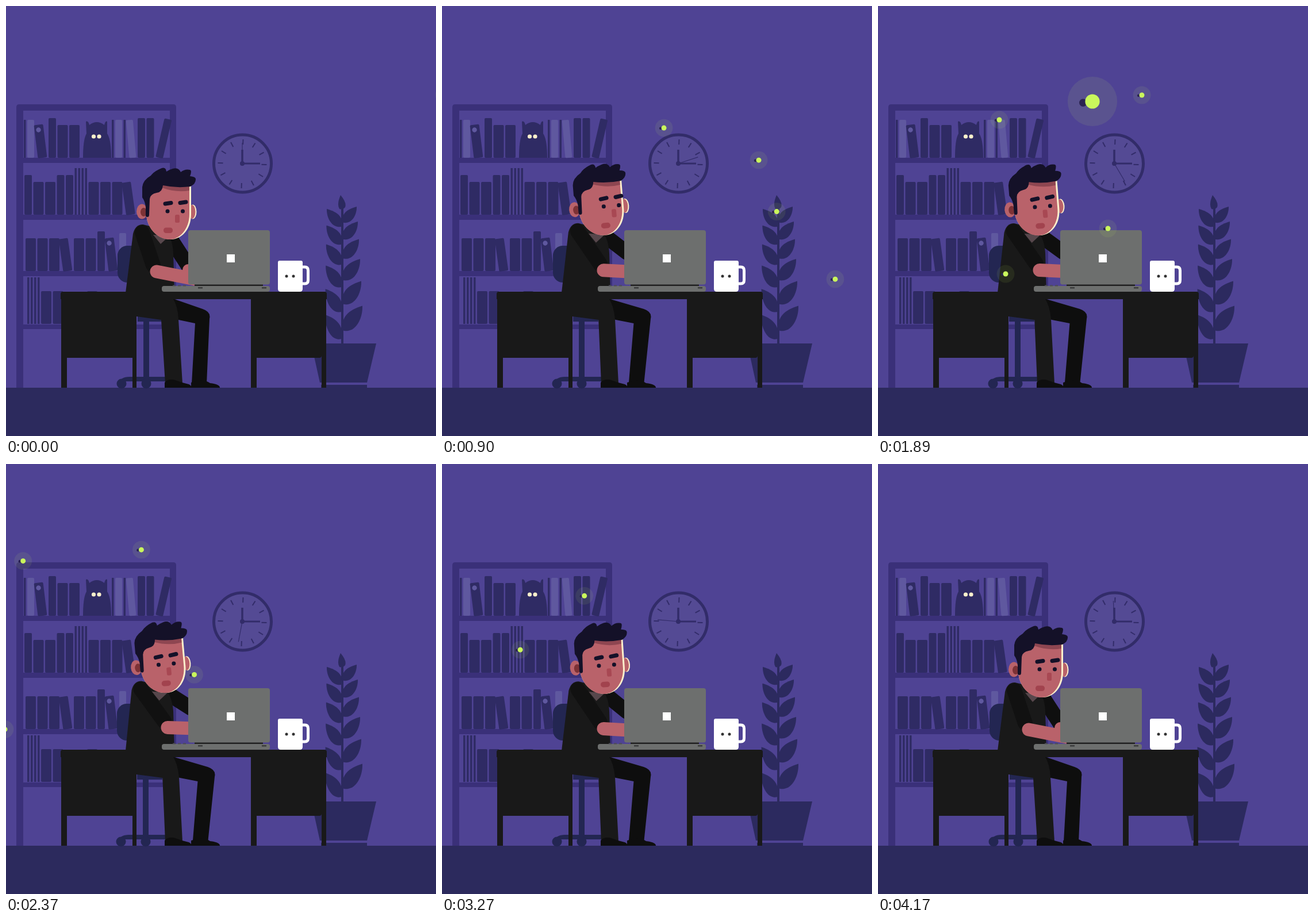
Animation of 748 by 748 pixels, one loop 4.2 s. Source, as an HTML page:

```html
<!DOCTYPE html>
<html lang="en">
<head>
<meta charset="utf-8">
<title>Night shift</title>
<style>
  html, body { margin: 0; width: 100%; height: 100%; overflow: hidden; background: #4f4394; }
  svg { display: block; width: 100vw; height: 100vh; }
  .shelf { fill: #3a3079; }
  .book { fill: #2f2b64; }
  .light { fill: #5f589f; }
  .night { fill: #2c2a5f; }
  .chair { fill: #232652; }
  .ink { fill: #141128; }
  .desk { fill: #191919; }
  .black { fill: #0e0e0e; }
  .skin { fill: #b9626a; }
  .cream { fill: #fdf0cc; }
  .grey { fill: #6d6f6e; }
  .dial { stroke: #322c69; fill: none; }
  .limb { fill: none; stroke-linecap: round; }
  .brow { stroke: #141128; stroke-width: 7; stroke-linecap: round; }
</style>
</head>
<body>
<svg viewBox="0 0 748 748">
  <rect width="748" height="748" fill="#4f4394"/>

  <g id="shelves">
    <path class="shelf" fill-rule="evenodd" d="M18 664V176Q18 171 23 171H291Q296 171 296 176V664H285V182H30V664Z"/>
    <path class="shelf" d="M30 264H285V273H30ZM30 363H285V372H30ZM30 461H285V470H30ZM30 554H285V562H30Z"/>
  </g>
  <path class="book" d="M134 264Q134 232 140 222L139 201Q143 199 145 207Q158 197 171 207Q173 199 176 201L176 222Q183 232 183 264Z"/>
  <g class="cream"><circle cx="152.500" cy="227" r="3.600"/><circle cx="162" cy="227" r="3.600"/></g>

  <g class="dial">
    <circle cx="411.500" cy="274" r="50" fill="#544a94" stroke-width="5"/>
    <g id="ticks" stroke-width="2"></g>
    <path d="M411 274V250" stroke-width="3.500"/>
    <path d="M411 274H442" stroke-width="3"/>
    <path id="second" d="M411 274V238" stroke-width="1.200"/>
    <circle cx="411" cy="274" r="4" fill="#322c69" stroke="none"/>
  </g>

  <g id="plant" class="night">
    <path d="M583 345H587V590H583ZM582 329Q593 342 590 350Q586 355 580 353Q575 345 582 329Z"/>
    <path d="M531 587H644L628 655H546ZM548 659H628V665H548Z"/>
  </g>

  <rect y="664" width="748" height="84" fill="#2c2a5d"/>

  <g id="chair" class="chair">
    <rect x="193" y="417" width="45" height="64" rx="17"/>
    <path d="M228 540H272V549H228ZM238 541H248V660H238ZM196 657Q197 645 214 645H284V653H206Z"/>
    <circle cx="200" cy="657" r="8.500"/><circle cx="243" cy="657" r="8.500"/>
  </g>

  <path id="farLeg" class="black"/>
  <path class="black" d="M322 664V655Q345 648 355 656Q372 658 372 664Z"/>
  <path id="nearLeg" class="desk"/>
  <path class="black" d="M276 664V655Q280 649 292 650Q305 655 318 658Q323 660 322 664Z"/>

  <path id="farArm" class="limb" stroke="#0f0f0f" stroke-width="26"/>
  <ellipse id="farHand" class="skin" cy="459" rx="10" ry="10"/>
  <path id="torso" class="desk"/>
  <path id="collar" d="M256 398L284 400L269 414Z" fill="#57474c"/>
  <path id="sleeve" class="limb" stroke="#111" stroke-width="26"/>

  <g id="head">
    <ellipse class="cream" cx="325" cy="358" rx="6.500" ry="12.500"/>
    <ellipse class="skin" cx="323.500" cy="358" rx="6" ry="12"/>
    <ellipse class="skin" cx="236.500" cy="357.500" rx="9.500" ry="13"/>
    <ellipse cx="239.500" cy="358.500" rx="5.500" ry="7.500" fill="#7d3236"/>
    <path class="cream" d="M244 312H322V362C322 390 304 406 287 406C262 406 245 385 244 362Z"/>
    <path class="skin" d="M244 312H319V362C319 388 302 406 285 406C262 406 245 385 244 362Z"/>
    <path d="M268 311H319V321Q296 325 271 316Z" fill="#8e4651"/>
    <path class="ink" d="M243 366Q249 369 249 363L250 336Q251 327 262 325Q272 324 273 312Q296 317 321 314Q330 309 330 302Q331 297 320 296Q324 286 320 285Q311 283 304 289Q300 280 290 283Q283 285 279 288Q278 280 271 282Q258 287 252 295Q238 303 237 315V333Q242 340 243 350Z"/>
    <g id="face">
      <path class="brow" d="M277 344L287 342.500M303 342.500L313 341"/>
      <g id="eyes" class="ink"><circle cx="281" cy="357" r="3.500"/><circle cx="307.500" cy="357" r="3.500"/></g>
      <rect x="294" y="363" width="8" height="14" rx="2.500" fill="#a84853"/>
      <rect id="mouth" x="274" y="385.500" width="16" height="9.500" rx="4.500" fill="#a2434e"/>
    </g>
  </g>

  <rect class="grey" x="271" y="487" width="188" height="10" rx="4"/>
  <path d="M290 486.500H315" stroke="#4c4d55" stroke-width="2" stroke-dasharray="5 4"/>
  <path id="forearm" class="limb" stroke="#b9626a" stroke-width="23"/>
  <rect x="328" y="483" width="119" height="4" fill="#202020"/>
  <rect class="grey" x="317" y="390" width="142" height="94.500" rx="4"/>
  <path d="M334 489H342V491.500H334ZM445 489H453V491.500H445Z" fill="#3b3c3c"/>
  <rect x="384" y="432" width="14" height="14" fill="#fff"/>

  <path class="desk" d="M99 497H554Q558 497 558 501V510H557V664H549V608Q549 612 545 612H436V664H426V510H227V664H220V612H106V664H96V510H95V501Q95 497 99 497Z"/>

  <path d="M514 454H520Q525.500 454 525.500 460V477Q525.500 483 520 483H514" fill="none" stroke="#fff" stroke-width="5"/>
  <path d="M476 443H513Q516 443 516 446V492Q516 497 511 497H478Q473 497 473 492V446Q473 443 476 443Z" fill="#fff"/>
  <g fill="#333"><circle cx="488" cy="470" r="2.500"/><circle cx="500" cy="470" r="2.500"/></g>

  <g id="flies"></g>
</svg>

<script>
const LOOP = 4200, STEP = 30;
const el = id => document.getElementById(id);
const set = (id, attr, value) => el(id).setAttribute(attr, value);
const smooth = u => { u = Math.min(1, Math.max(0, u)); return u * u * (3 - 2 * u); };

function add(parent, tag, attrs) {
  const node = document.createElementNS('http://www.w3.org/2000/svg', tag);
  for (const key in attrs) node.setAttribute(key, attrs[key]);
  return parent.appendChild(node);
}

const kinds = {
  tall: { w: 13, h: 69 },
  short: { w: 18, h: 57 },
  slim: { w: 3.5, h: 66 },
  thin: { w: 3.5, h: 81 },
  pale: { w: 12, h: 66, tone: 'light' },
  paleLean: { w: 12, h: 66, tone: 'light', tilt: -5 },
  lean: { w: 16, h: 57, tilt: -8 },
  dotted: { w: 16, h: 58, tilt: -7, dot: true },
  fallen: { w: 13, h: 69, tilt: 13 }
};

// Stands books side by side; a tilted one takes more room
function shelve(floor, x, row) {
  for (const name of row.split(' ')) {
    const { w, h, tone = 'book', tilt = 0, dot } = kinds[name];
    if (tilt < 0) x += 4;
    const book = add(el('shelves'), 'g', { transform: `translate(${x + w / 2} ${floor}) rotate(${tilt})` });
    add(book, 'rect', { x: -w / 2, y: -h, width: w, height: h, rx: w > 5 ? 2 : 0, class: tone });
    if (dot) add(book, 'circle', { cx: -1, cy: 9 - h, r: 4.2, class: 'light' });
    x += w + 2.5;
  }
}
shelve(264, 31, 'slim pale dotted tall short short');
shelve(264, 184, 'slim pale slim paleLean tall tall fallen');
shelve(363, 32, 'tall short short tall tall thin thin thin thin short short short lean');
shelve(461, 34, 'short short short lean short short tall dotted pale');
shelve(553, 37, 'thin thin thin thin short short');
shelve(553, 141, 'short');

for (let i = 0; i < 12; i++)
  add(el('ticks'), 'path', { d: 'M411 232V241', transform: `rotate(${i * 30 + 2} 411 274.500)` });

function leaf(y, w, h) {
  add(el('plant'), 'path', {
    transform: `translate(585 ${y}) scale(${w} ${h})`,
    d: 'M0 0C-.05 -.55 .3 -.82 1 -1C1.02 -.55 .75 0 .25 .04Q.06 .05 0 0Z'
  });
}
for (let i = 0; i < 6; i++) {
  leaf(383 + 29 * i + 2 * i * i, -27 - 0.6 * i, 30 + 2.2 * i);
  leaf(376 + 27 * i + 2.1 * i * i, 25 + 2 * i, 27 + 3 * i);
}

// Smooth curve through points [time, x, y], running on straight past both ends
function along(points, t) {
  const last = points.length - 1;
  const slope = (n, k) => {
    const p = points[Math.max(0, n - 1)], q = points[Math.min(last, n + 1)];
    return (q[k] - p[k]) / (q[0] - p[0]);
  };
  const end = t < points[0][0] ? 0 : last;
  if (t < points[0][0] || t > points[last][0])
    return [1, 2].map(k => points[end][k] + slope(end, k) * (t - points[end][0]));

  let i = 0;
  while (i < last - 1 && t >= points[i + 1][0]) i++;
  const a = points[i], b = points[i + 1], span = b[0] - a[0], u = (t - a[0]) / span;
  return [1, 2].map(k => a[k] + (b[k] - a[k]) * smooth(u)
    + span * u * (1 - u) * (slope(i, k) * (1 - u) - slope(i + 1, k) * u));
}

// Head offset from rest; the rest of the body follows it
const sway = [[0, 0, 0], [510, 5.5, 0], [1350, -19, -16], [1890, -7, -7.5], [2880, -13, -10], [3600, 3, -3], [4170, 0, 0]];

function drawMan(t) {
  const [hx, hy] = along(sway, t);
  const reach = smooth(t / 900) * (1 - smooth((t - 3600) / 560));
  const gaze = 6.5 * reach * Math.sin(t / 3600 * 2 * Math.PI);
  const bx = hx * 0.35 + reach, by = hy * 0.28, knee = 9 * reach;
  const ex = 262 + 19 * reach, ey = 462 + 0.35 * hx;

  set('head', 'transform', `translate(${294 + hx} ${357 + hy}) rotate(${hy * 0.6}) translate(-294 -357)`);
  set('face', 'transform', `translate(${gaze} ${hy * 0.1})`);
  set('mouth', 'transform', `translate(${5 * reach - gaze * 0.8} 0)`);
  set('eyes', 'visibility', Math.abs(t - 1350) < 100 ? 'hidden' : 'visible');

  set('collar', 'transform', `translate(${bx} ${by})`);
  set('torso', 'd', `M208 499L${221 + bx} ${396 + by}Q${225 + bx} ${380 + by} ${238 + bx} ${380 + by}`
    + `L${272 + bx} ${388 + by}Q${290 + bx / 2} ${400 + by} 291 430L293 499Z`);
  set('sleeve', 'd', `M${237 + bx} ${394 + by}L${ex - 6} ${ey - 11}`);
  set('forearm', 'd', `M${ex} ${ey}L328 ${475 - 9 * reach + 0.6 * hx}`);
  set('farArm', 'd', `M${287 + bx} ${406 + by * 2}L322 ${460 - 24 * reach + 1.1 * hx}`);
  set('farHand', 'cx', 317 + 12 * reach);

  set('farLeg', 'd', `M228 510H293L${342 + knee} 527Q${357 + knee} 532 ${354 + knee} 544`
    + `L${349 + knee / 4} 657H${323 + knee / 5}L${329 + knee / 2} 552L272 540Z`);
  set('nearLeg', 'd', `M208 505H288Q299 520 ${300 + knee / 9} 545L307 657H277L${270 + knee / 4} 546L227 540Z`);
  set('chair', 'transform', `translate(${1 - reach} 0)`);
}

const flights = [
  { path: [[510, 549, 187], [1350, 198, 241]] },
  { path: [[510, 663, 302], [1350, 415, 231], [1890, 211, 198]] },
  { path: [[510, 710, 359], [1350, 452, 360], [1890, 400, 387], [2880, 234, 337], [3600, 45, 313]] },
  { path: [[1350, 474, 471], [1890, 222, 466]] },
  { path: [[1350, 710, 249], [1890, 459, 155], [2300, 268, 150]] },
  { path: [[1650, 639, 172], [1890, 373, 166]], size: 2.8 },
  { path: [[2880, 486, 186], [3600, 46, 266]] }
];
for (const fly of flights) {
  fly.node = add(el('flies'), 'g', {});
  add(fly.node, 'circle', { r: 15.4, fill: '#c9f75c', 'fill-opacity': 0.085 });
  add(fly.node, 'circle', { cx: -5.8, cy: 0.8, r: 2.4, fill: '#2a2350' });
  add(fly.node, 'circle', { r: 4.5, fill: '#c9f75c' });
}

function drawFlies(t) {
  for (const { path, node, size = 1 } of flights) {
    const [x, y] = along(path, t);
    node.setAttribute('transform', `translate(${x} ${y}) scale(${size})`);
  }
}

function draw() {
  const t = Math.floor(performance.now() % LOOP / STEP) * STEP;
  const turn = t / LOOP;
  drawMan(t);
  drawFlies(t);
  set('second', 'transform', `rotate(${360 * turn - 13 * Math.sin(Math.PI * turn) ** 2} 411 274)`);
  requestAnimationFrame(draw);
}
draw();
</script>
</body>
</html>
```
